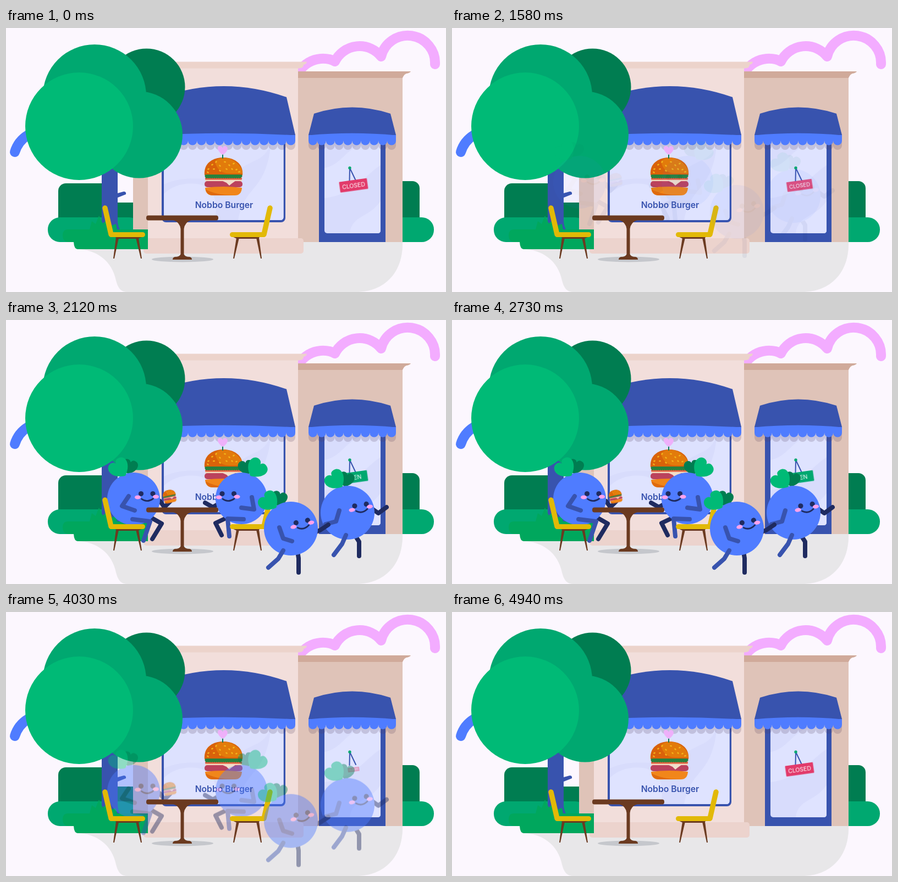
Animation, 800 px wide and 481 px high, one loop 4970 ms. Source, as an HTML page:

```html
<!DOCTYPE html>
<html lang="en">
<head>
<meta charset="utf-8">
<title>Burger shop</title>
<style>
  html, body { margin: 0; width: 100%; height: 100%; overflow: hidden; background: #fcf7fe; }
  svg { display: block; width: 100vw; height: 100vh; }
  text { font-family: Inter, "Open Sans", sans-serif; text-anchor: middle; }
  .limb { fill: none; stroke-width: 8; stroke-linecap: round; stroke-linejoin: round; }
  .guest { animation: drop 4.97s infinite, fade 4.97s linear infinite; }
  .closed, .open { transform-origin: 632px 287px; }
  .closed { animation: closed 4.97s linear infinite; }
  .open { animation: open 4.97s linear infinite; }
  @keyframes drop {
    0%, 31.2% { transform: translateY(-60px); animation-timing-function: cubic-bezier(.34, 1.5, .64, 1); }
    41.2%, 76.9% { transform: none; animation-timing-function: cubic-bezier(.36, 0, .66, -.5); }
    84%, 100% { transform: translateY(-60px); }
  }
  @keyframes fade {
    0%, 31.2% { opacity: 0; }
    41.2%, 77.3% { opacity: 1; }
    84%, 100% { opacity: 0; }
  }
  @keyframes closed {
    0%, 31.2% { transform: none; opacity: 1; }
    36.5% { opacity: 0; }
    38% { transform: scale(0); opacity: 0; }
    80.3% { transform: scale(0); opacity: 0; animation-timing-function: cubic-bezier(.34, 1.6, .64, 1); }
    88.5%, 100% { transform: none; opacity: 1; }
  }
  @keyframes open {
    0%, 36% { transform: scale(0); animation-timing-function: cubic-bezier(.34, 1.6, .64, 1); }
    42.3%, 76.9% { transform: none; }
    80.3%, 100% { transform: scale(0); }
  }
</style>
</head>
<body>
<svg id="stage" viewBox="0 0 800 481" preserveAspectRatio="none"></svg>
<script>
const NAVY = '#3853ae', BLUE = '#4f7cff', INK = '#1f2b60', BROWN = '#6b3a20', YELLOW = '#e2b906';
const BRIGHT = '#00ba76', MID = '#00a870', DARK = '#007d51', GRASS = '#00a75d';

const rect = (x, y, w, h, fill, r = 0) =>
  `<rect x="${x}" y="${y}" width="${w}" height="${h}" rx="${r}" fill="${fill}"/>`;
const circle = (x, y, r, fill) => `<circle cx="${x}" cy="${y}" r="${r}" fill="${fill}"/>`;
const ellipse = (x, y, rx, ry, fill) => `<ellipse cx="${x}" cy="${y}" rx="${rx}" ry="${ry}" fill="${fill}"/>`;
const shape = (d, fill, extra = '') => `<path d="${d}" fill="${fill}" ${extra}/>`;
const line = (d, stroke, width) =>
  `<path d="${d}" fill="none" stroke="${stroke}" stroke-width="${width}" stroke-linecap="round" stroke-linejoin="round"/>`;
const limb = (points, color) => `<polyline class="limb" points="${points}" stroke="${color}"/>`;

function valance(left, right, count, top, base) {
  const r = (right - left) / count / 2;
  const scallops = `a${r} 8 0 0 1 ${-2 * r} 0`.repeat(count);
  return `M${left} ${top}H${right}V${base}${scallops}Z`;
}

function awning(left, right, count, inset, shoulder, control) {
  const mid = (left + right) / 2;
  return shape(valance(left, right, count, 205, 214), '#503c5a', 'opacity=".2"') +
    shape(valance(left, right, count, 194, 205.5), BLUE) +
    shape(`M${left} 195L${left + inset} ${shoulder}Q${mid} ${control} ${right - inset} ${shoulder}L${right} 195Z`, NAVY) +
    shape(`M${left} 195.5Q${mid} 188 ${right} 195.5Z`, BLUE);
}

function burger() {
  const seeds = [[375, 249], [382, 244], [389, 251], [398, 244], [406, 250], [414, 247], [411, 257],
    [401, 257], [419, 258], [378, 257], [368, 257], [389, 260], [424, 262], [367, 263]];
  return shape('M361 268C359 247 375 236 395 236S432 247 430 268Z', '#d9620a') +
    shape('M380 243C389 234 405 235 416 243C426 250 430 258 430 265H405C392 265 382 256 380 243Z', '#e27b0b') +
    seeds.map(([x, y]) => `<ellipse cx="${x}" cy="${y}" rx="2" ry="1.3" fill="#f3b51c" transform="rotate(${x * 37 % 90 - 45} ${x} ${y})"/>`).join('') +
    rect(362, 272, 67, 5, '#e2603f', 2) + rect(362, 276.5, 67, 3, '#f3d8bd', 1) +
    rect(361.5, 267, 68, 5, '#27813d', 2) + line('M363 271' + 'q2 4 4 0'.repeat(16), '#27813d', 2) +
    rect(361, 279, 69, 11, '#bb425d', 5) +
    shape('M392 278H418L411 283L406 287L401 282Z', '#f2ddca') +
    shape('M362 291Q395 287 429 291Q428 305 416 305H374Q363 304 362 291Z', '#f1861a') +
    shape('M363 294Q365 305 377 305H414Q380 304 363 294Z', '#df6a0d');
}

function pick() {
  return line('M394 226V237', '#087853', 2) +
    shape('M394 231C382 223 384 214 389 215Q393 215 394 219Q397 213 401 216C406 220 400 228 394 231Z', '#eeb0fa');
}

function sign(name, label, color) {
  return `<g class="${name}"><g transform="rotate(-8 632 287)">` +
    rect(606.5, 277, 51, 19.5, color, 1) +
    `<text x="632" y="290.7" font-size="10.5" fill="#fff">${label}</text></g></g>`;
}

function chair(mirror) {
  const flip = mirror ? ' transform="translate(660 0) scale(-1 1)"' : '';
  return `<g${flip}>` +
    shape('M197 380H249L240 384H203Z', BROWN) +
    shape('M200 382H205L197 420H195Z', BROWN) + shape('M236 382H241L247 420H245Z', BROWN) +
    line('M180 328L191 376', YELLOW, 9.5) + rect(187, 372, 66, 9, YELLOW, 4.5) + '</g>';
}

function table() {
  return ellipse(321, 421.5, 56, 5, '#c5c7cc') + rect(255, 341.5, 131, 9, BROWN, 4) +
    shape('M304 350H337Q325 354 323.5 366V412Q325 417 334 417Q338 418 338 422H303Q303 418 307 417Q316 417 317.5 412V366Q316 354 304 350Z', BROWN);
}

const leaf = (x, y, angle, fill, scale = 1) =>
  `<path transform="translate(${x} ${y}) rotate(${angle}) scale(${scale})" fill="${fill}" d="M0 18C-25 7 -22 -15 -9 -16Q-2 -16 0 -10Q3 -17 10 -15C23 -12 22 7 0 18Z"/>`;

// Eyes and cheeks sit around the given centre; tilt follows the walk direction.
function face(x, y, tilt) {
  return `<g transform="translate(${x} ${y}) rotate(${tilt})">` +
    circle(-11, -4.5, 4.6, INK) + circle(10.5, -4.5, 4.6, INK) +
    ellipse(-17, 2, 5.6, 3.5, '#ffa2ec') + ellipse(16, 1, 5.6, 3.5, '#ffa2ec') +
    line('M-10 5Q0 12.5 11 4.5', INK, 2.8) + '</g>';
}

function guest({ body: [x, y, r], back, front, dark, light, look }) {
  return back.map(p => limb(p, INK)).join('') +
    leaf(...dark, DARK, .78) + circle(x, y, r, BLUE) + leaf(...light, BRIGHT) +
    front.map(p => limb(p, NAVY)).join('') + face(...look);
}

const diners = [
  { body: [232, 326, 48], back: ['280,330 288,341 298,331', '262,359 283,371 266,399'],
    front: ['223,321 211,339 234,347', '230,363 262,367 250,402'],
    dark: [225, 267, 12], light: [206, 269.5, -38], look: [256.5, 321, 0] },
  { body: [428, 325, 47], back: ['362,333 376,341 390,333', '400,361 381,370 392,392'],
    front: ['447,323 451,345 428,342', '432,363 403,362 406,394'],
    dark: [437, 268, -12], light: [456, 270.5, 40], look: [404, 321, 0] },
];
const walkers = [
  { body: [621, 351, 49], back: ['660,340 677,352 692,341', '635,393 642,404 642,430'],
    front: ['606,347 600,367 581,372', '618,392 611,408 596,428'],
    dark: [619, 290, 12], light: [599, 291, -44], look: [645.5, 341.5, -9] },
  { body: [518, 380, 49], back: ['555,389 571,383 586,373', '530,422 532,434 532,460'],
    front: ['497,378 504,398 520,403', '504,420 495,435 477,451'],
    dark: [497, 325, 12], light: [478, 330, -48], look: [539, 371.5, -12] },
];
const enter = content => `<g class="guest">${content}</g>`;

const scenery =
  shape('M124 389H721V394C721 444 690 481 636 481H222C208 481 204 474 200 460C193 425 165 403 128 403Z', '#e8e7e9') +
  line('M532 80Q548 58 572 56Q588 55 598 61A50 50 0 0 1 682 52A49.7 49.7 0 0 1 780 66', '#f3acff', 18) +
  line('M16 226Q22 206 40 195', BLUE, 18) +
  rect(95, 283, 95, 80, DARK, 14) + rect(150, 318, 90, 50, DARK) + rect(76, 345, 170, 45, MID, 22) +
  rect(690, 279, 62, 80, DARK, 13) + rect(670, 345, 108, 45, MID, 22);

const building =
  rect(231, 90, 28, 290, '#dfc3b8') + rect(531, 85, 190, 305, '#dfc3b8') +
  shape('M531 79H736Q734 82 728 83Q724 84 721 91H531Z', '#d0aa9a') +
  rect(258, 70, 273, 316, '#f2dedb') +
  shape('M240 61.5H547Q546 66 541 67Q541 73.5 532 73.5H240Z', '#ecd3cb') +
  rect(250, 383, 291, 28, '#ecd3cd', 5);

const windows =
  rect(283, 190, 225, 164, NAVY, 8) + rect(287, 190, 217.5, 160, '#d8dcfc', 5) +
  shape('M287 302Q310 280 347 284Q390 291 380 350H292Q287 350 287 345Z', '#dfe3ff') +
  shape('M422 350C433 284 475 300 482 205H504.5V345Q504 350 499 350Z', '#dfe3ff') +
  shape('M287 205H482C475 245 441 239 421 262C398 291 340 260 287 285Z', '#dfe3ff', 'opacity=".75"') +
  rect(569, 200, 121, 190, NAVY) + rect(579, 200, 102, 174, '#d8dcfc', 5) +
  shape('M579 255C610 250 616 220 652 210H681V250C650 270 635 303 579 310Z', '#dfe3ff') +
  shape('M625 374C629 340 660 347 681 315V369Q681 374 676 374Z', '#dfe3ff');

const signs =
  line('M625 255L624.5 279M625 255L636 278', NAVY, 2) + circle(625, 255, 2.7, MID) +
  sign('closed', 'CLOSED', '#e23b6b') + sign('open', 'OPEN', MID);

const tree =
  shape('M174 245H203V301L214 298Q219 298 218 303L203 309V350Q203 360 207 367H172Q174 360 174 350Z', NAVY) +
  circle(255.5, 107.5, 70, DARK) + circle(161, 124, 94, MID) + circle(242, 194.5, 79, MID) +
  circle(133, 179, 98, BRIGHT) +
  shape('M113 367H152L156 352L163 357L169 342L176 356L187 347L191 360L200 357L202 367H258V403H130Q124 403 123 390H113Q103 389 103 378Q103 367 113 367Z', GRASS);

const snack = `<g transform="translate(297 321) rotate(-12) scale(.34) translate(-395 -270)">${burger()}</g>`;

document.getElementById('stage').innerHTML =
  rect(0, 0, 800, 481, '#fcf7fe') + scenery + building + windows +
  awning(266, 526, 16, 16, 126, 86) + awning(550, 709, 10, 10, 156, 133) +
  burger() + pick() +
  `<text x="396.5" y="328" font-size="15.7" font-weight="600" fill="${NAVY}">Nobbo Burger</text>` +
  signs + tree +
  enter(diners.map(guest).join('') + snack) +
  chair(false) + chair(true) + table() +
  enter(walkers.map(guest).join(''));
</script>
</body>
</html>
```
